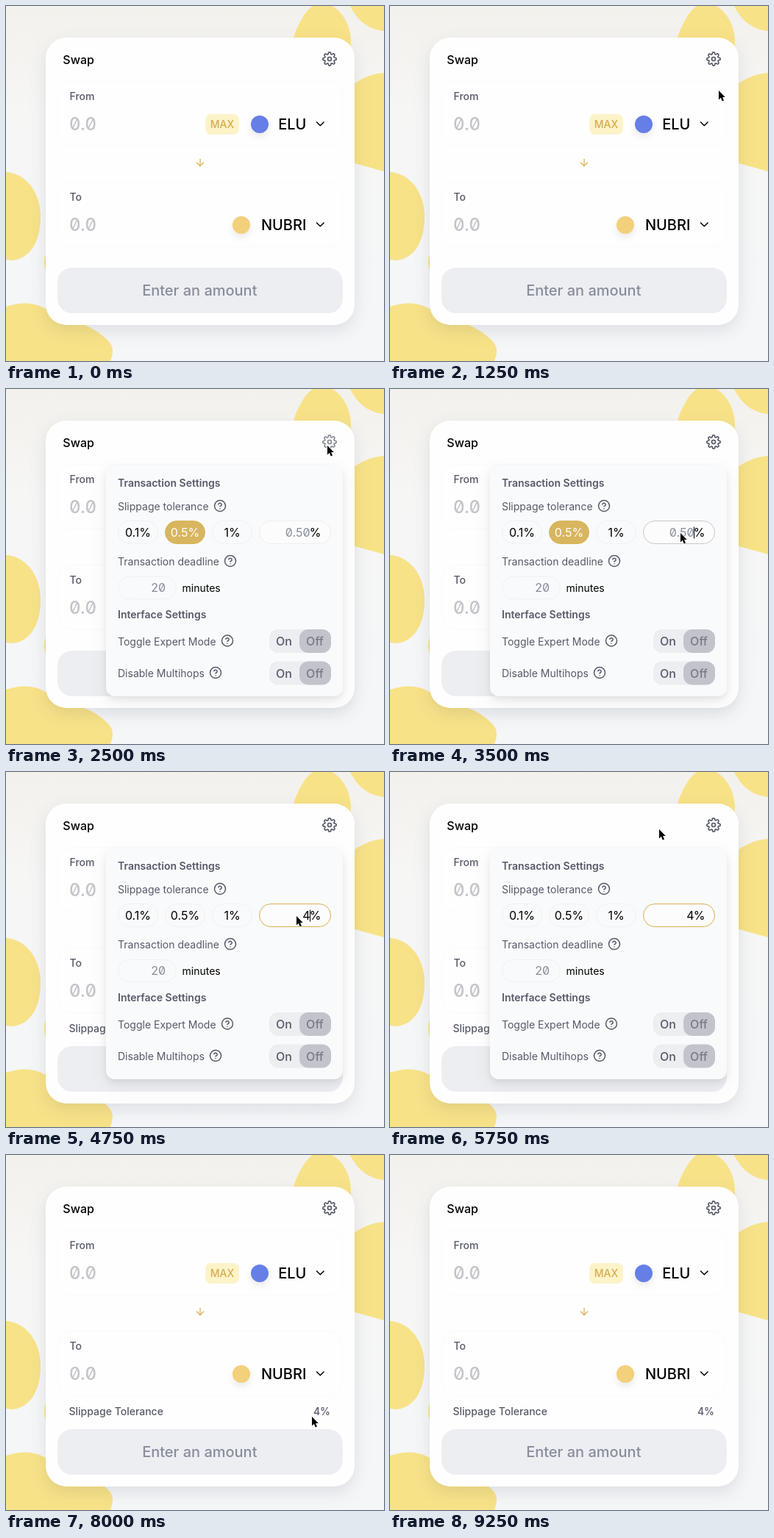
Recreate the animation shown at these times as an HTML page. Size 514 by 483 pixels, loop 9750 ms.

```html
<!DOCTYPE html>
<html lang="en">
<head>
<meta charset="utf-8">
<title>Swap settings</title>
<style>
html, body { margin: 0; width: 100%; height: 100%; overflow: hidden; background: #f4f5f6; }
svg { display: block; width: 100vw; height: 100vh; }
text { font: 500 14px Inter, sans-serif; fill: #565a69; white-space: pre; }
.big { font-size: 20px; fill: #000; }
.mid { font-size: 16px; }
.reg { font-weight: 400; }
.bold { font-weight: 600; }
.dark { fill: #000; }
.c { text-anchor: middle; }
.e { text-anchor: end; }
.num { font-feature-settings: "zero"; }
.line { fill: none; stroke-linecap: round; stroke-linejoin: round; }
#card { filter: drop-shadow(0 8px 11px rgba(40, 45, 60, .11)); }
#pop { filter: drop-shadow(0 4px 5px rgba(0, 0, 0, .08)) drop-shadow(0 10px 12px rgba(0, 0, 0, .05)); }
.coin { filter: drop-shadow(0 5px 5px rgba(0, 0, 0, .08)); }
</style>
</head>
<body>
<svg viewBox="0 0 514 483" xmlns="http://www.w3.org/2000/svg">
  <defs>
    <linearGradient id="sky" x2="0" y2="1">
      <stop offset="0" stop-color="#f3f1ec"/>
      <stop offset=".3" stop-color="#f6f6f5"/>
      <stop offset="1" stop-color="#f4f6f8"/>
    </linearGradient>
  </defs>
  <rect width="514" height="483" fill="url(#sky)"/>
  <g fill="#f8e288">
    <path d="M390 46C397 22 412 -4 428 -4C451 -4 470 22 469 52L460 80H400Z"/>
    <path d="M468 0C477 18 491 32 514 34V0Z"/>
    <path d="M460 116C474 104 492 92 514 91V225L460 210Z"/>
    <path d="M0 226C30 228 47 257 47 287C47 322 31 346 6 346L0 345Z"/>
    <ellipse cx="82" cy="349" rx="30" ry="32"/>
    <path d="M0 409C18 403 36 402 54 412C80 428 110 431 128 446C140 455 145 461 145 469Q145 476 142 483H0Z"/>
  </g>
  <rect id="card" x="54" y="43" width="420" height="391" rx="28" fill="#fefefe"/>
  <text class="mid dark" x="77.3" y="79">Swap</text>
  <g id="gear" class="line" transform="translate(430 62) scale(.8333)" stroke="#565a69" stroke-width="2">
    <circle cx="12" cy="12" r="3"/>
    <path d="M19.4 15a1.65 1.65 0 0 0 .33 1.82l.06.06a2 2 0 1 1-2.83 2.83l-.06-.06a1.65 1.65 0 0 0-2.8 1.17V21a2 2 0 0 1-4 0v-.09a1.65 1.65 0 0 0-2.9-1.08l-.06.06a2 2 0 1 1-2.83-2.83l.06-.06a1.65 1.65 0 0 0-1.17-2.8H3a2 2 0 0 1 0-4h.09a1.65 1.65 0 0 0 1.08-2.9l-.06-.06a2 2 0 1 1 2.83-2.83l.06.06a1.65 1.65 0 0 0 2.9-1.08V3a2 2 0 0 1 4 0v.09a1.65 1.65 0 0 0 2.9 1.08l.06-.06a2 2 0 1 1 2.83 2.83l-.06.06a1.65 1.65 0 0 0 1.08 2.9H21a2 2 0 0 1 0 4h-.09a1.65 1.65 0 0 0-1.51 1z"/>
  </g>
  <g id="rows"></g>
  <rect x="271" y="147" width="46" height="28" rx="8" fill="#fdf3c9"/>
  <text class="c" x="294" y="166" style="fill:#d5ac50">MAX</text>
  <path class="line" d="M264 208.3v9.4m4.7-4.7l-4.7 4.7l-4.7-4.7" stroke="#dbb45a" stroke-width="1.33"/>
  <g id="slip">
    <text x="85.5" y="354">Slippage Tolerance</text>
    <text class="e" x="441" y="354">4%</text>
  </g>
  <g id="button">
    <rect x="70" y="356" width="388" height="62" rx="20" fill="#edeef2"/>
    <text class="big c" x="263.3" y="394" style="fill:#888d9b">Enter an amount</text>
  </g>
  <g id="panel">
    <rect id="pop" x="136" y="103" width="322" height="315" rx="12" fill="#f9fafb"/>
    <text class="bold" x="152" y="133">Transaction Settings</text>
    <text class="bold" x="152" y="312">Interface Settings</text>
    <g id="items"></g>
    <rect id="field" x="344.5" y="179.5" width="97" height="31" rx="15.5" fill="#fcfcfd"/>
    <text id="value" class="mid reg num e" x="413.5" y="201"></text>
    <text class="mid reg dark e" x="428.5" y="201">%</text>
    <path id="caret" d="M413.5 187.5v16" stroke="#000"/>
    <rect x="152.5" y="255.5" width="79" height="30" rx="15" fill="none" stroke="#f0f1f4"/>
    <text class="mid reg num e" x="217" y="276" style="fill:#888d9b">20</text>
    <text class="reg dark" x="239.5" y="276">minutes</text>
  </g>
  <path id="cursor" d="M1 1V13.4L3.8 10.8L5.8 15.4L8 14.5L6.1 10H9.8Z" fill="#000" stroke="#fff" stroke-width="1.6" stroke-linejoin="round" paint-order="stroke"/>
</svg>
<script>
const $ = id => document.getElementById(id);
const LOOP = 9750, STEP = 250, GROW = 17;

function tokenRow(y, label, name, coinX, color) {
  return `<rect x="70.5" y="${y + .5}" width="387" height="88" rx="20" fill="none" stroke="#f9fafb"/>
    <text x="86.5" y="${y + 25.6}">${label}</text>
    <text class="num" x="86" y="${y + 67}" style="font-size:24px;fill:#c3c5cb">0.0</text>
    <circle class="coin" cx="${coinX}" cy="${y + 59}" r="12" fill="${color}"/>
    <text class="big e" x="408.4" y="${y + 66}">${name}</text>
    <path class="line" d="M422.5 ${y + 56}l4.8 4.8l4.8-4.8" stroke="#000" stroke-width="1.5"/>`;
}

function helpLine(y, label, x) {
  return `<text class="reg" x="152" y="${y + 5.5}">${label}</text>
    <g class="line" transform="translate(${x - 9} ${y - 9.5}) scale(.75)" stroke="#565a69" stroke-width="2">
      <circle cx="12" cy="12" r="10"/>
      <path d="M9.09 9a3 3 0 0 1 5.83 1c0 2-3 3-3 3M12 17h.01"/>
    </g>`;
}

function choice(x, label, id) {
  return `<rect id="${id}Box" x="${x + .5}" y="179.5" width="54" height="31" rx="15.5" fill="none" stroke="#f0f1f4"/>
    <text id="${id}" class="mid reg dark c" x="${x + 27.5}" y="201">${label}</text>`;
}

function toggle(y) {
  return `<rect x="358" y="${y}" width="84" height="32" rx="12" fill="#edeef2"/>
    <rect x="399" y="${y}" width="43" height="32" rx="12" fill="#c3c4cb"/>
    <text class="mid c" x="378" y="${y + 22}">On</text>
    <text class="mid c" x="420" y="${y + 22}" style="fill:#777a86">Off</text>`;
}

$("rows").innerHTML =
  tokenRow(102, "From", "ELU", 345, "#667fe6") +
  tokenRow(239, "To", "NUBRI", 320, "#f3d07a");
$("items").innerHTML =
  helpLine(159.5, "Slippage tolerance", 291) +
  helpLine(234.5, "Transaction deadline", 305) +
  helpLine(343, "Toggle Expert Mode", 301) +
  helpLine(386.5, "Disable Multihops", 285) +
  choice(152, "0.1%", "low") + choice(216, "0.5%", "half") + choice(280, "1%", "one") +
  toggle(327) + toggle(370.5);

// Pointer stops: time, x, y
const path = [
  [250, 482, 124], [1250, 446, 114], [2250, 436, 76], [2500, 436, 76],
  [3250, 394, 195], [5000, 394, 195], [5750, 365, 77], [6500, 365, 77],
  [7750, 419, 358], [8000, 415, 355], [8750, 419, 357], [9250, 419, 357]
];

function pointer(t) {
  let i = 1;
  while (i < path.length - 1 && t > path[i][0]) i++;
  const [t0, x0, y0] = path[i - 1], [t1, x1, y1] = path[i];
  const k = (t - t0) / (t1 - t0), e = k * k * (3 - 2 * k);
  return [x0 + (x1 - x0) * e, y0 + (y1 - y0) * e];
}

const within = (t, a, b) => t >= a && t < b;
const show = (id, on) => $(id).setAttribute("visibility", on ? "inherit" : "hidden");

function draw(time) {
  const t = Math.floor(time % LOOP / STEP) * STEP;
  const typed = t >= 4500, focus = t >= 3500;

  $("card").setAttribute("height", 391 + (typed ? GROW : 0));
  $("button").setAttribute("transform", `translate(0 ${typed ? GROW : 0})`);
  show("slip", typed);
  $("gear").setAttribute("opacity", within(t, 2000, 2750) ? .7 : 1);

  show("panel", within(t, 2500, 6000));
  $("halfBox").setAttribute("fill", typed ? "none" : "#d8b55f");
  $("halfBox").setAttribute("stroke", typed ? "#f0f1f4" : "#d8b55f");
  $("half").style.fill = typed ? "#000" : "#fff";
  $("field").setAttribute("stroke", typed ? "#d9b04f" : focus ? "#c6c8ce" : "#edeef2");
  $("value").textContent = typed ? "4" : "0.50";
  $("value").style.fill = typed ? "#000" : "#888d9b";
  show("caret", within(t, 3500, 4000) || within(t, 4500, 5500));

  show("cursor", within(t, 250, 9250));
  $("cursor").setAttribute("transform", `translate(${pointer(t)})`);
}

const start = performance.now();
function tick() {
  draw(performance.now() - start);
  requestAnimationFrame(tick);
}
tick();
</script>
</body>
</html>
```
